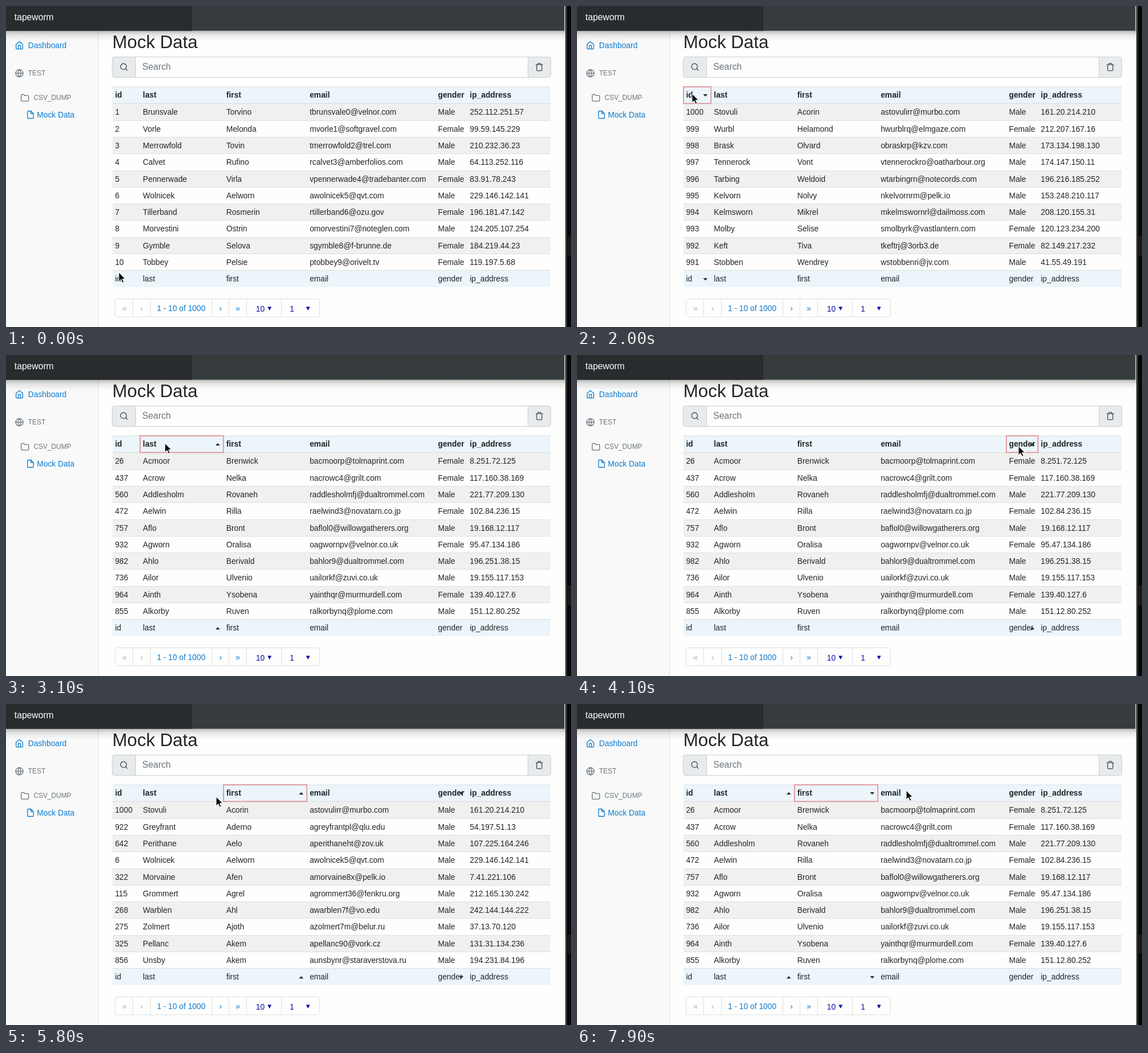
Write an HTML page that moves like this. It is 992 px wide and 564 px high and loops after 8 s.

```html
<!DOCTYPE html>
<html lang="en">
<head>
<meta charset="utf-8">
<title>Mock Data</title>
<style>
  html, body { margin: 0; width: 100%; height: 100%; overflow: hidden; background: #fefefd; }
  svg { display: block; }
  text { font: 13.8px "Liberation Sans", Arial, sans-serif; fill: #212529; white-space: pre; }
  .head text { font-weight: bold; }
  .icon { fill: none; stroke-width: 2; stroke-linecap: round; stroke-linejoin: round; }
  .blue { stroke: #0c7bd0; }
  .grey { stroke: #6c757d; }
  .dark { stroke: #43494e; }
  text.link { fill: #0c7bd0; }
  text.small { font-size: 11.9px; fill: #6c757d; }
  text.off { fill: #a9adb0; }
  text.pick { fill: #1010a8; }
  text.mid { text-anchor: middle; }
  .line { stroke: #dcdfe2; fill: none; }
</style>
</head>
<body>
<svg id="stage" width="992" height="564" viewBox="0 0 992 564">
  <defs>
    <linearGradient id="shade" x2="0" y2="1">
      <stop offset="0" stop-color="#000" stop-opacity=".26"/>
      <stop offset=".4" stop-color="#000" stop-opacity=".09"/>
      <stop offset="1" stop-color="#000" stop-opacity="0"/>
    </linearGradient>
  </defs>
  <rect width="992" height="564" fill="#fefefd"/>
  <rect width="162" height="564" fill="#f8f9f8"/>
  <path class="line" d="M162.5 44V564"/>

  <g class="icon blue" transform="translate(15.7 61.3) scale(.65)">
    <path d="M3 9l9-7 9 7v11a2 2 0 0 1-2 2H5a2 2 0 0 1-2-2zM9 22V12h6v10"/>
  </g>
  <text class="link" x="38.8" y="74">Dashboard</text>
  <g class="icon grey" transform="translate(15.7 110.4) scale(.65)">
    <circle cx="12" cy="12" r="10"/>
    <path d="M2 12h20M12 2a15.3 15.3 0 0 1 4 10 15.3 15.3 0 0 1-4 10 15.3 15.3 0 0 1-4-10 15.3 15.3 0 0 1 4-10z"/>
  </g>
  <text class="small" x="38.8" y="122.3">TEST</text>
  <g class="icon grey" transform="translate(25.4 153.5) scale(.65)">
    <path d="M22 19a2 2 0 0 1-2 2H4a2 2 0 0 1-2-2V5a2 2 0 0 1 2-2h5l2 3h9a2 2 0 0 1 2 2z"/>
  </g>
  <text class="small" x="48.4" y="165">CSV_DUMP</text>
  <g class="icon blue" transform="translate(35.2 183.2) scale(.65)">
    <path d="M13 2H6a2 2 0 0 0-2 2v16a2 2 0 0 0 2 2h12a2 2 0 0 0 2-2V9zM13 2v7h7"/>
  </g>
  <text class="link" x="54.3" y="196">Mock Data</text>

  <text x="186.8" y="73.5" style="font-size:31.3px">Mock Data</text>
  <rect x="186.5" y="89.5" width="770" height="36" rx="4" fill="#fefefe"/>
  <path d="M227 89.5H190.5a4 4 0 0 0-4 4V121.5a4 4 0 0 0 4 4H227zM916 89.5H952.5a4 4 0 0 1 4 4V121.5a4 4 0 0 1-4 4H916z" fill="#e8ebec"/>
  <rect x="186.5" y="89.5" width="770" height="36" rx="4" fill="none" stroke="#c9ced2"/>
  <path d="M227.5 90V125M916.5 90V125" stroke="#c9ced2"/>
  <g class="icon dark" transform="translate(199.2 99.3) scale(.65)">
    <circle cx="11" cy="11" r="8"/><path d="M21 21l-4.35-4.35"/>
  </g>
  <g class="icon dark" transform="translate(928.5 99.3) scale(.65)">
    <path d="M3 6h18M19 6v14a2 2 0 0 1-2 2H7a2 2 0 0 1-2-2V6m3 0V4a2 2 0 0 1 2-2h4a2 2 0 0 1 2 2v2"/>
  </g>
  <text x="239.3" y="112.3" style="font-size:15.8px;fill:#6c757d">Search</text>

  <g id="table"></g>

  <rect class="line" x="191.5" y="514.5" width="359" height="31.5" rx="3"/>
  <path class="line" d="M222.5 515v31M253.5 515v31M361.5 515v31M391.5 515v31M422.5 515v31M483.5 515v31"/>
  <text class="off mid" x="208" y="536">«</text>
  <text class="off mid" x="238.3" y="536">‹</text>
  <text class="link mid" x="307.5" y="536">1 - 10 of 1000</text>
  <text class="link mid" x="376.5" y="536">›</text>
  <text class="link mid" x="407" y="536">»</text>
  <text class="pick" x="438.8" y="536.5">10</text>
  <text class="pick" x="498.3" y="536.5">1</text>
  <path d="M459.2 528.5h7l-3.5 6.5zM526.7 528.5h7l-3.5 6.5z" fill="#1010a8"/>

  <rect y="43.6" width="982" height="18" fill="url(#shade)"/>
  <rect width="980" height="43.6" fill="#363b3d"/>
  <rect width="327" height="43.6" fill="#282c2e"/>
  <text x="14.8" y="25" style="font-size:15.7px;fill:#fff">tapeworm</text>
  <rect x="980" width="2" height="43.6" fill="#a5a8a8"/>
  <rect x="982" width="3" height="564" fill="#353939"/>
  <rect x="985" width="7" height="564" fill="#070707"/>
  <rect x="986" y="405" width="6" height="34" fill="#1b1817"/>

  <path id="cursor" d="M0 0V16L3.8 12.5L6.4 18.3L9 17.1L6.4 11.5H11.3Z" fill="#0a0a0a" stroke="#fff" stroke-width="1" stroke-linejoin="round"/>
</svg>
<script>
// id, last, first, mail host, gender, ip
const people = `1 Brunsvale Torvino velnor.com M 252.112.251.57
2 Vorle Melonda softgravel.com F 99.59.145.229
3 Merrowfold Tovin trel.com M 210.232.36.23
4 Calvet Rufino amberfolios.com M 64.113.252.116
5 Pennerwade Virla tradebanter.com F 83.91.78.243
6 Wolnicek Aelworn qvt.com M 229.146.142.141
7 Tillerband Rosmerin ozu.gov F 196.181.47.142
8 Morvestini Ostrin noteglen.com M 124.205.107.254
9 Gymble Selova f-brunne.de F 184.219.44.23
10 Tobbey Pelsie orivelt.tv F 119.197.5.68
13 Vorn Tiberonde garvoli.org M 2.251.51.193
14 Rolvey Marten tallykeeper.com M 233.80.117.28
15 Merivell Dorn norvelia.edu M 66.185.168.112
17 Plomer Dovvy oste.edu M 4.132.54.206
18 Krellis Ubin harbourlantern.com M 18.240.239.152
26 Acmoor Brenwick tolmaprint.com F 8.251.72.125
115 Grommert Agrel fenkru.org M 212.165.130.242
268 Warblen Ahl vo.edu M 242.144.144.222
275 Zolmert Ajoth belur.ru M 37.13.70.120
322 Morvaine Afen pelk.io M 7.41.221.106
325 Pellanc Akem vork.cz M 131.31.134.236
437 Acrow Nelka grilt.com F 117.160.38.169
472 Aelwin Rilla novatarn.co.jp F 102.84.236.15
560 Addlesholm Rovaneh dualtrommel.com M 221.77.209.130
642 Perithane Aelo zov.uk M 107.225.164.246
736 Ailor Ulvenio zuvi.co.uk M 19.155.117.153
757 Aflo Bront willowgatherers.org M 19.168.12.117
855 Alkorby Ruven plome.com M 151.12.80.252
856 Unsby Akem staraverstova.ru M 194.231.84.196
922 Greyfrant Aderno qlu.edu M 54.197.51.13
932 Agworn Oralisa velnor.co.uk F 95.47.134.186
964 Ainth Ysobena murmurdell.com F 139.40.127.6
982 Ahlo Berivald dualtrommel.com M 196.251.38.15
991 Stobben Wendrey jv.com M 41.55.49.191
992 Keft Tiva 3orb3.de F 82.149.217.232
993 Molby Selise vastlantern.com F 120.123.234.200
994 Kelmsworn Mikrel dailmoss.com M 208.120.155.31
995 Kelvorn Nolvy pelk.io M 153.248.210.117
996 Tarbing Weldoid notecords.com M 196.216.185.252
997 Tennerock Vont oatharbour.org M 174.147.150.11
998 Brask Olvard kzv.com M 173.134.198.130
999 Wurbl Helamond elmgaze.com F 212.207.167.16
1000 Stovuli Acorin murbo.com M 161.20.214.210`.split("\n").map(line => {
  const [id, last, first, host, sex, ip_address] = line.split(" ");
  const email = (first[0] + last).toLowerCase() + (id - 1).toString(36) + "@" + host;
  return { id: +id, last, first, email, gender: sex === "M" ? "Male" : "Female", ip_address };
});

const cols = ["id", "last", "first", "email", "gender", "ip_address"];
const edges = [187, 235.5, 382, 528.5, 753.8, 809.7, 956];
const textX = [191.4, 240.3, 386.7, 533.2, 758.5, 814.3];
const top0 = 172, rowH = 29.28, lag = 100, loop = 8000;

// time, sort order ("-" is descending), focused column
const clicks = [
  [0, "", ""],
  [1000, "id", "id"],
  [1500, "-id", "id"],
  [2900, "last", "last"],
  [4100, "gender", "gender"],
  [4500, "-gender", "gender"],
  [5500, "-gender first", "first"],
  [6500, "last", "last"],
  [7300, "last first", "first"],
  [7500, "last -first", "first"],
];

// time, x, y of the pointer tip
const path = [
  [0, 198, 468], [200, 198, 468], [900, 205, 156], [1500, 202, 154],
  [2200, 202, 154], [2700, 277, 157], [3100, 279, 155], [3300, 279, 155],
  [3900, 772, 158], [4100, 775, 160], [4550, 775, 160], [5000, 443, 175],
  [5300, 425, 160], [5500, 425, 160], [5800, 369, 163], [6200, 300, 158],
  [6700, 300, 158], [7100, 440, 156], [7500, 440, 156], [7900, 578, 152],
];

const table = document.getElementById("table");
const cursor = document.getElementById("cursor");

function add(parent, tag, attrs, text = "") {
  const el = document.createElementNS("http://www.w3.org/2000/svg", tag);
  for (const key in attrs) el.setAttribute(key, attrs[key]);
  el.textContent = text;
  return parent.appendChild(el);
}

function band(y, h, fill) {
  add(table, "rect", { x: 187, y, width: 769, height: h, fill });
}

function rule(y, h = 1) {
  add(table, "rect", { x: 187, y, width: 769, height: h, fill: "#dcdfe2" });
}

function textRow(y, words, cls = "") {
  const g = add(table, "g", { class: cls });
  return textX.map((x, i) => add(g, "text", { x, y }, words[i]));
}

band(142, 30, "#ebf5fa");
rule(141.5);
rule(170.7, 1.6);
textRow(161, cols, "head");
const cells = [];
for (let i = 0; i <= 10; i++) {
  const y = top0 + i * rowH;
  if (i === 10) band(y, 29, "#ebf5fa");
  else if (i % 2 === 0) band(y, rowH, "#f0f0ef");
  if (i) rule(Math.floor(y));
  const row = textRow(y + 19.4, i === 10 ? cols : []);
  if (i < 10) cells.push(row);
}
const arrows = add(table, "path", { fill: "#212529" });
const ring = add(table, "rect", { y: 142, height: 29.3, fill: "none", stroke: "#e0949a", "stroke-width": 1.8 });

const parse = order => order.split(" ").filter(Boolean).map(key =>
  key[0] === "-" ? [key.slice(1), -1] : [key, 1]);

const stateAt = t => clicks.filter(c => c[0] <= t).pop() || clicks[0];

function topRows(order) {
  const keys = [...parse(order), ["id", 1]];
  return [...people].sort((a, b) => {
    for (const [key, dir] of keys) {
      if (a[key] !== b[key]) return a[key] < b[key] ? -dir : dir;
    }
    return 0;
  }).slice(0, 10);
}

function arrow(key, dir) {
  const x = edges[cols.indexOf(key) + 1] - 10.2;
  return [157, 480.2].map(y => `M${x - 4} ${y + 2 * dir}h8l-4 ${-4 * dir}z`).join("");
}

function pointer(t) {
  const n = path.findIndex(p => p[0] > t);
  if (n < 0) return path[path.length - 1].slice(1);
  const [t0, x0, y0] = path[n - 1], [t1, x1, y1] = path[n];
  const u = (t - t0) / (t1 - t0), k = u * u * (3 - 2 * u);
  return [x0 + (x1 - x0) * k, y0 + (y1 - y0) * k];
}

let shownOrder = null;
function draw(t) {
  const [, order, focus] = stateAt(t);
  arrows.setAttribute("d", parse(order).map(p => arrow(...p)).join(""));
  const c = cols.indexOf(focus);
  ring.style.display = c < 0 ? "none" : "";
  if (c >= 0) {
    ring.setAttribute("x", edges[c]);
    ring.setAttribute("width", edges[c + 1] - edges[c] - 0.3);
  }
  const dataOrder = stateAt(t - lag)[1];
  if (dataOrder !== shownOrder) {
    topRows(dataOrder).forEach((p, r) =>
      cols.forEach((key, i) => { cells[r][i].textContent = p[key]; }));
    shownOrder = dataOrder;
  }
  cursor.setAttribute("transform", `translate(${pointer(t)})`);
}

const start = performance.now();
let lastTick = -1;
function frame() {
  const tick = Math.floor(((performance.now() - start) % loop) / 100);
  if (tick !== lastTick) draw((lastTick = tick) * 100);
  requestAnimationFrame(frame);
}
frame();
</script>
</body>
</html>
```
